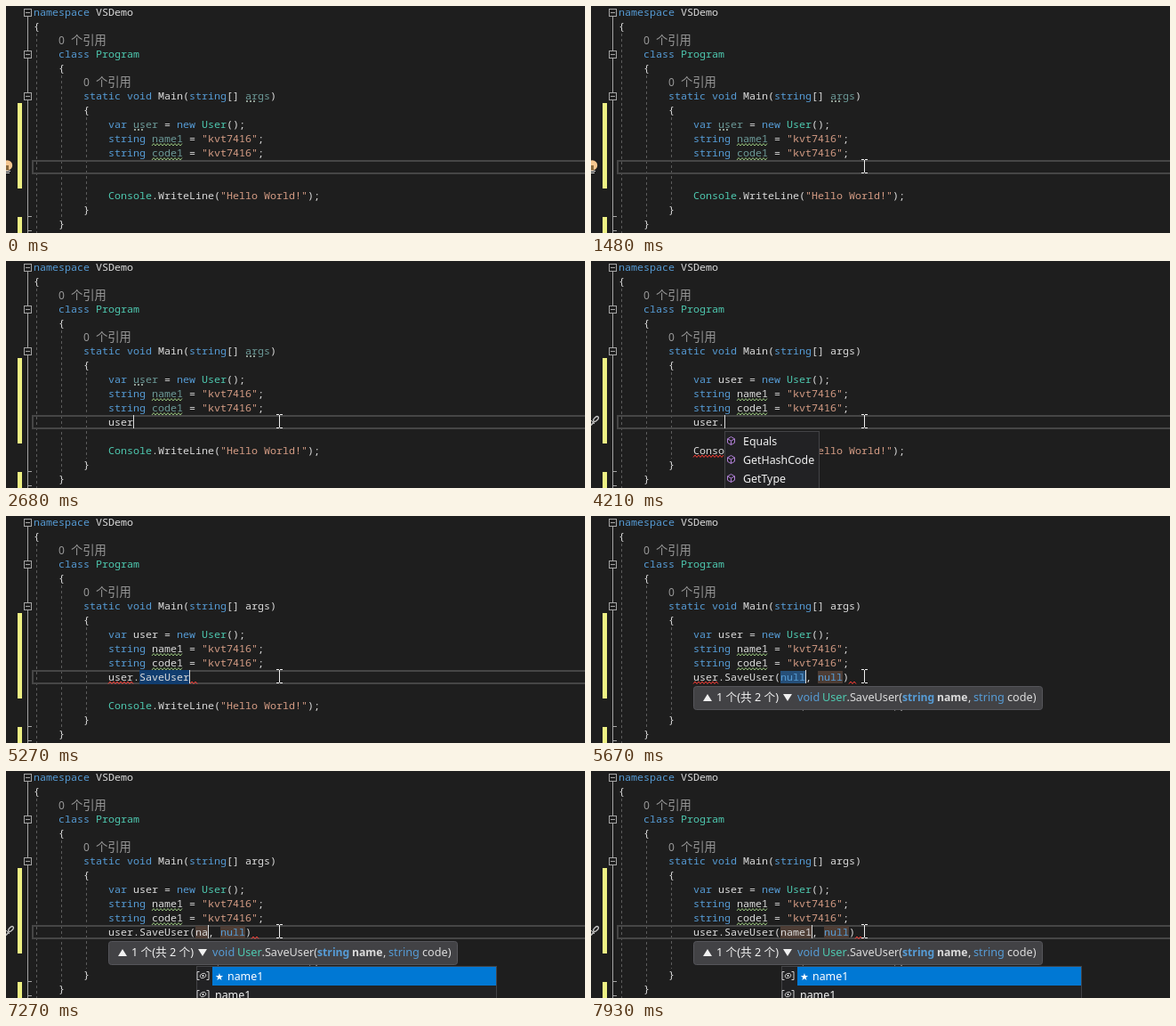
Animation, 651 px wide and 255 px high, one loop 8 s. Source, as an HTML page with a canvas:

```html
<!DOCTYPE html>
<html lang="zh">
<head>
<meta charset="utf-8">
<title>Editor completion</title>
<style>
html, body { margin: 0; width: 100%; height: 100%; overflow: hidden; background: #1e1e1e; }
canvas { display: block; }
</style>
</head>
<body>
<canvas id="stage" width="651" height="255"></canvas>
<script>
const ctx = document.getElementById('stage').getContext('2d', { alpha: false });
const LOOP = 8000, CHAR = 7, INDENT = 115, LINE_TOP = 173, LINE_H = 16;
const MONO = '11.667px "Noto Sans Mono", "DejaVu Sans Mono", monospace';
const UI = '"Noto Sans", "Noto Sans CJK SC", "Noto Sans CJK", sans-serif';
const CJK = '"Noto Sans CJK SC", "Noto Sans CJK", sans-serif';
const C = {
  bg: '#1e1e1e', text: '#dcdcdc', key: '#569cd6', type: '#4ec9b0', str: '#d69d85',
  faded: '#6c9a98', lens: '#999999', guide: '#5c5c5c', fold: '#a5a5a5',
  green: '#95c17b', red: '#fc3e36', field: '#4d3d35'
};

// The last entry whose time has been reached.
function at(t, steps) {
  let value = steps[0];
  for (const s of steps) if (t >= s[0]) value = s;
  return value;
}
const within = (t, a, b) => t >= a && t < b;

function box(x, y, w, h, color) {
  ctx.fillStyle = color;
  ctx.fillRect(x, y, w, h);
}
function label(s, x, y, color, font) {
  ctx.font = font;
  ctx.fillStyle = color;
  ctx.fillText(s, x, y);
}
// Pairs of text and colour laid out on the character grid.
function code(x, y, ...parts) {
  for (let i = 0; i < parts.length; i += 2) {
    label(parts[i], x, y, parts[i + 1], MONO);
    x += parts[i].length * CHAR;
  }
}
function path(points, color, width = 1) {
  ctx.strokeStyle = color;
  ctx.lineWidth = width;
  ctx.beginPath();
  points.forEach(([x, y]) => ctx.lineTo(x, y));
  ctx.stroke();
}
function squiggle(x, y, w, color) {
  const points = [];
  for (let i = 0; i <= w; i += 2) points.push([x + i, y + (i % 4 ? 0 : 2.5)]);
  path(points, color);
}
function hint(x, y) {
  for (let i = 0; i < 3; i++) box(x + i * 4, y, 2, 2, '#8f9d93');
}
function dashed(x, y1, y2) {
  ctx.setLineDash([3, 3]);
  path([[x, y1], [x, y2]], C.guide);
  ctx.setLineDash([]);
}

function gutter() {
  box(13, 109, 5, 96, '#eff284');
  box(13, 237, 5, 18, '#eff284');
  path([[24.5, 12], [24.5, 255]], C.fold);
  path([[24, 236.5], [29, 236.5]], C.fold);
  path([[24, 252.5], [29, 252.5]], C.fold);
  for (const y of [7, 54, 101]) {
    box(20, y - 4, 9, 9, C.bg);
    ctx.strokeStyle = C.fold;
    ctx.strokeRect(20.5, y - 3.5, 8, 8);
    box(22, y, 5, 1, C.fold);
  }
  dashed(34.5, 31, 255);
  dashed(62.5, 78, 237);
  dashed(90.5, 125, 222);
}

function bulb() {
  ctx.fillStyle = '#f5c78f';
  ctx.beginPath();
  ctx.arc(1.5, 179, 5.7, 0, 7);
  ctx.fill();
  box(0, 179, 3, 5, '#8a6a3c');
  box(0, 185, 5, 1, C.text);
  box(0, 187, 4, 1, C.text);
}
function screwdriver() {
  ctx.strokeStyle = '#c5c5c5';
  ctx.lineWidth = 1.3;
  ctx.beginPath();
  ctx.ellipse(5.5, 177.5, 3.6, 1.9, -0.8, 0, 7);
  ctx.stroke();
  path([[3.5, 180.5], [0, 184.5]], '#c5c5c5', 1.5);
  path([[0, 179], [4, 183]], '#c5c5c5');
}

function lens(x, y) {
  label('0', x, y, C.lens, '12px ' + UI);
  label('个引用', x + 14, y, C.lens, '13.3px ' + CJK);
}

function listing(t) {
  const unused = t < 2820, split = within(t, 3070, 5270);
  const name = unused ? C.faded : C.text;
  code(31, 11, 'namespace', C.key, ' VSDemo', C.text);
  code(31, 27, '{', C.text);
  lens(59, 43);
  code(59, 58, 'class', C.key, ' Program', C.type);
  code(59, 74, '{', C.text);
  lens(87, 90);
  code(87, 105, 'static void', C.key, ' Main(', C.text, 'string', C.key,
    '[] ', C.text, 'args', name, ')', C.text);
  code(87, 121, '{', C.text);
  code(INDENT, 137, 'var', C.key, ' user', name, ' = ', C.text,
    'new', C.key, ' User', C.type, '();', C.text);
  if (unused) {
    hint(270, 106);
    hint(144, 138);
  }
  ['name1', 'code1'].forEach((id, i) => {
    const y = 153 + i * 16;
    code(INDENT, y, 'string ', C.key, id, name, ' = ', C.text, '"kvt7416"', C.str, ';', C.text);
    squiggle(164, y + 1.5, 35, C.green);
  });
  code(INDENT, 217, 'Console', split ? C.text : C.type, '.WriteLine(', C.text,
    '"Hello World!"', C.str, ');', C.text);
  if (within(t, 4210, 5270)) squiggle(INDENT, 218, 35, C.red);
  code(87, 233, '}', C.text);
  code(59, 249, '}', C.text);
}

const TYPED = [
  [0, ''], [1800, 'us'], [1940, 'use'], [2010, 'user'], [2750, 'user.'],
  [4400, 'user.S'], [4470, 'user.Sa'], [5010, 'user.SaveUser']
];
const ARGUMENT = [[5600, 'null'], [7200, 'n'], [7270, 'na'], [7410, 'nam'], [7540, 'name'], [7930, 'name1']];

function activeLine(t) {
  let end;
  if (!within(t, 5600, 7200)) {
    ctx.strokeStyle = '#464646';
    ctx.lineWidth = 2;
    ctx.strokeRect(30, LINE_TOP + 1, 700, LINE_H - 2);
  }
  if (t < 5600) {
    const s = at(t, TYPED)[1];
    if (t >= 5270) box(150, LINE_TOP, 56, LINE_H, '#113d6f');
    code(INDENT, 185, s, C.text);
    end = INDENT + s.length * CHAR;
    if (within(t, 2820, 3400)) squiggle(151, 186, 8, C.red);
    if (t >= 5130) {
      squiggle(INDENT, 186, 28, C.red);
      squiggle(207, 186, 8, C.red);
    }
  } else {
    const arg = at(t, ARGUMENT)[1], selected = arg === 'null', x = 213;
    end = x + arg.length * CHAR;
    box(x, LINE_TOP + 1, end - x, LINE_H - 2, selected ? '#264f78' : C.field);
    box(end + 14, LINE_TOP + 1, 28, LINE_H - 2, C.field);
    code(INDENT, 185, 'user.SaveUser(', C.text, arg, selected ? C.key : C.text,
      ', ', C.text, 'null', C.key, ')', C.text);
    if (t < 6210) squiggle(INDENT, 186, 28, C.red);
    squiggle(end + 49, 186, 8, C.red);
  }
  const hidden = t < 940 || within(t, 1480, 1800) || within(t, 3200, 3740) ||
    within(t, 4260, 4400) || within(t, 6140, 6660);
  if (!hidden) box(end, LINE_TOP, 1, 15, C.text);
}

function cube(x, y) {
  const color = '#b180d7';
  path([[x, y - 4.5], [x + 4, y - 2.2], [x + 4, y + 2.2], [x, y + 4.5],
    [x - 4, y + 2.2], [x - 4, y - 2.2], [x, y - 4.5]], color);
  path([[x - 4, y - 2.2], [x, y], [x + 4, y - 2.2]], color);
  path([[x, y], [x, y + 4.5]], color);
}
function variable(x, y) {
  for (const side of [-1, 1])
    path([[x + side * 4, y - 4.5], [x + side * 6.5, y - 4.5], [x + side * 6.5, y + 4.5], [x + side * 4, y + 4.5]], '#d0d0d0');
  ctx.beginPath();
  ctx.ellipse(x, y, 3.5, 2.5, -0.4, 0, 7);
  ctx.stroke();
  box(x - 1, y - 1, 2, 2, '#d0d0d0');
}

function popup(x, y, w, h, icon, rows, selected) {
  box(x, y, w, h, '#222224');
  ctx.strokeStyle = '#434346';
  ctx.lineWidth = 1;
  ctx.strokeRect(x + 0.5, y + 0.5, w - 1, h - 1);
  rows.forEach((name, i) => {
    const mid = y + 11.5 + i * 21;
    if (i === selected) box(x + 18, mid - 10.5, w - 19, 21, '#0078d4');
    icon(x + 7.5, mid - 0.5);
    const starred = name[0] === '★';
    const color = i === selected ? '#ffffff' : '#f1f1f1';
    if (starred) label('★', x + 21, mid + 4.5, color, '11px "DejaVu Sans", sans-serif');
    label(starred ? name.slice(2) : name, x + (starred ? 35 : 21), mid + 4.5, color, '12.4px ' + UI);
  });
}

function signature() {
  ctx.fillStyle = '#424245';
  ctx.strokeStyle = '#55555a';
  ctx.lineWidth = 1;
  ctx.beginPath();
  ctx.roundRect(115.5, 191.5, 392, 26, 3);
  ctx.fill();
  ctx.stroke();
  const font = '12.7px ' + UI, bold = 'bold 12.2px ' + UI, y = 208;
  for (const [x, dir] of [[131, -1], [221, 1]]) {
    ctx.fillStyle = '#f1f1f1';
    ctx.beginPath();
    ctx.moveTo(x - 5, 204 - dir * 4);
    ctx.lineTo(x + 5, 204 - dir * 4);
    ctx.lineTo(x, 204 + dir * 4);
    ctx.fill();
  }
  label('1 个(共 2 个)', 141, y, '#f1f1f1', font);
  label('void', 232, y, C.key, font);
  label('User', 260, y, C.type, font);
  label('.SaveUser(', 287.5, y, C.text, font);
  label('string', 350, y, C.key, bold);
  label('name', 389, y, C.text, bold);
  label(',', 424, y, C.text, font);
  label('string', 430, y, C.key, font);
  label('code)', 468, y, C.text, font);
}

function popups(t) {
  if (within(t, 2010, 2680)) popup(116, 191, 311, 90, variable, ['★ user', 'user', 'User'], 0);
  if (within(t, 2820, 4400)) popup(150, 191, 107, 90, cube, ['Equals', 'GetHashCode', 'GetType', 'SaveUser'], -1);
  if (within(t, 4400, 5010)) popup(150, 191, 122, 52, cube, ['SaveUser'], 0);
  if (t >= 5670) signature();
  if (t >= 7270) popup(214, 219, 338, 90, variable, ['★ name1', 'name1', 'nameof'], 0);
}

const POINTER = [
  [200, 326, 208], [270, 313, 201], [520, 311, 194], [590, 309, 186], [660, 308, 179],
  [730, 307, 175], [800, 307, 176], [870, 307, 178], [940, 307, 180]
];
function pointer(t) {
  if (t < 200) return;
  const [, x, y] = at(t, POINTER);
  const color = '#f0f0f0';
  box(x, y - 7, 1, 14, color);
  for (const edge of [y - 8, y + 7]) {
    box(x - 3, edge, 3, 1, color);
    box(x + 1, edge, 3, 1, color);
  }
}

function frame(now) {
  const t = now % LOOP;
  box(0, 0, 651, 255, C.bg);
  gutter();
  listing(t);
  activeLine(t);
  if (t < 1800) bulb();
  if (within(t, 3400, 4400) || t >= 6410) screwdriver();
  popups(t);
  pointer(t);
}

const start = performance.now();
function tick() {
  frame(performance.now() - start);
  requestAnimationFrame(tick);
}
tick();
</script>
</body>
</html>
```
